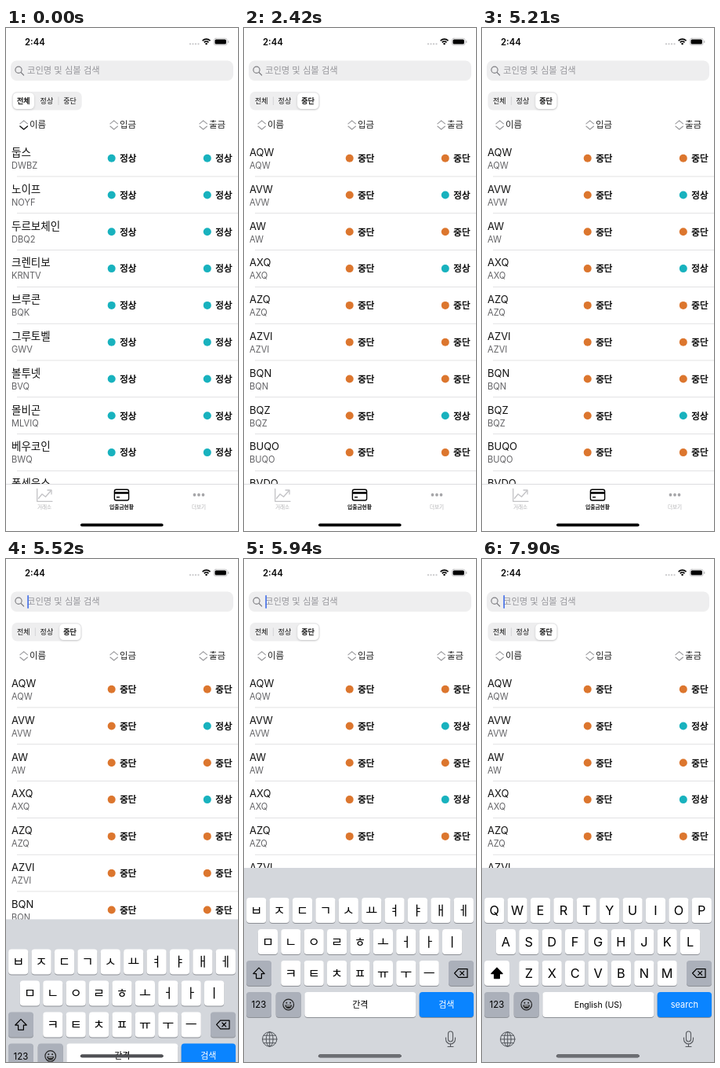
Recreate the animation shown at these times as an HTML page with a canvas. Size 296 by 640 pixels, loop 8000 ms.

```html
<!DOCTYPE html>
<html lang="ko">
<head>
<meta charset="utf-8">
<title>입출금현황</title>
<style>
html, body { margin: 0; width: 100%; height: 100%; overflow: hidden; background: #fff; }
canvas { display: block; width: 296px; height: 640px; }
</style>
</head>
<body>
<canvas id="stage"></canvas>
<script>
const W = 296, H = 640, LOOP = 8000;
const TEAL = '#18b2be', ORANGE = '#dc762e';
const FONT = 'Inter, "Noto Sans CJK KR", sans-serif';
const cv = document.getElementById('stage');
const c = cv.getContext('2d');
const dpr = window.devicePixelRatio || 1;
cv.width = W * dpr;
cv.height = H * dpr;

const pairs = s => s.split(',').map(p => p.split('/'));
const LISTS = [
  { rows: pairs('둡스/DWBZ,노이프/NOYF,두르보체인/DBQ2,크렌티보/KRNTV,브루콘/BQK,그루토벨/GWV,볼투넷/BVQ,몰비곤/MLVIQ,베우코인/BWQ,퐁센욱스/PWX') },
  { rows: pairs('1온체/1ONQE,ADWQ/ADWQ,AVUQ/AVUQ,LQ/LQ,NVQ/NVQ,SDWT/SDWT,골누/GLNU,보이너코인/BHQ,두허니2/DHQ2,부체인/BUQ') },
  { rows: pairs('AQW/AQW,AVW/AVW,AW/AW,AXQ/AXQ,AZQ/AZQ,AZVI/AZVI,BQN/BQN,BQZ/BQZ,BUQO/BUQO,BVDQ/BVDQ'),
    halted: true, open: [1, 3, 7] }
];
const KEYS = {
  ko: ['ㅂㅈㄷㄱㅅㅛㅕㅑㅐㅔ', 'ㅁㄴㅇㄹㅎㅗㅓㅏㅣ', 'ㅋㅌㅊㅍㅠㅜㅡ'],
  en: ['QWERTYUIOP', 'ASDFGHJKL', 'ZXCVBNM']
};

const clamp = x => Math.max(0, Math.min(1, x));
const ramp = (t, a, b) => clamp((t - a) / (b - a));
const easeOut = x => 1 - Math.pow(1 - x, 3);
const smooth = x => x * x * (3 - 2 * x);

function text(s, x, y, size, color, weight = 400, align = 'left') {
  c.font = `${weight} ${size}px ${FONT}`;
  c.fillStyle = color;
  c.textAlign = align;
  c.fillText(s, x, y);
}
// Hangul has no medium weight installed, so a thin outline thickens the regular one
function medium(s, x, y, size, color, align) {
  text(s, x, y, size, color, 400, align);
  pen(color, size * 0.035);
  c.strokeText(s, x, y);
}
function rect(x, y, w, h, color) {
  c.fillStyle = color;
  c.fillRect(x, y, w, h);
}
function round(x, y, w, h, r, color) {
  c.beginPath();
  c.roundRect(x, y, w, h, r);
  c.fillStyle = color;
  c.fill();
}
function disc(x, y, r, color) {
  c.beginPath();
  c.arc(x, y, r, 0, 7);
  c.fillStyle = color;
  c.fill();
}
function pen(color, width) {
  c.strokeStyle = color;
  c.lineWidth = width;
  c.lineCap = c.lineJoin = 'round';
}
function poly(pts, close) {
  c.beginPath();
  for (let i = 0; i < pts.length; i += 2) c.lineTo(pts[i], pts[i + 1]);
  if (close) c.closePath();
}
function line(...pts) {
  poly(pts);
  c.stroke();
}
function withAlpha(a, draw) {
  if (a <= 0) return;
  c.save();
  c.globalAlpha = a;
  draw();
  c.restore();
}

function statusBar() {
  text('2:44', 24, 21.6, 11.3, '#000', 600);
  for (let i = 0; i < 4; i++) disc(235 + i * 3.5, 20.3, 1.15, '#c8c8ca');
  pen('#000', 1.7);
  c.lineCap = 'butt';
  for (const r of [4, 7]) {
    c.beginPath();
    c.arc(255.6, 21.2, r, -Math.PI * 0.75, -Math.PI * 0.25);
    c.stroke();
  }
  c.beginPath();
  c.moveTo(255.6, 21.6);
  c.arc(255.6, 21.6, 2.4, -Math.PI * 0.75, -Math.PI * 0.25);
  c.fillStyle = '#000';
  c.fill();
  pen('#b4b4b6', 0.7);
  c.beginPath();
  c.roundRect(265.2, 13.2, 17, 8.6, 2.6);
  c.stroke();
  round(266.5, 14.5, 14.4, 6, 1.5, '#000');
  round(283.2, 16, 1.1, 3, 0.6, '#b4b4b6');
}

function searchField(focused) {
  round(6, 41.5, 284, 25.5, 7.5, '#eeeeef');
  pen('#808085', 1.2);
  c.beginPath();
  c.arc(16, 53.3, 4.1, 0, 7);
  c.stroke();
  line(19.1, 56.5, 22.6, 60);
  text('코인명 및 심볼 검색', 27, 58.2, 11.3, '#96969b');
  if (focused) round(27.3, 46, 1.6, 17, 0.8, '#3f6be8');
}

function segments(pos, pressed) {
  const step = 29.7;
  round(7.5, 81, 89.2, 23.4, 6.5, '#eeeeef');
  for (const i of [1, 2]) {
    const gap = Math.min(Math.abs(pos - i), Math.abs(pos - i + 1));
    withAlpha(clamp(gap), () => rect(7.2 + i * step, 87.5, 0.8, 10.5, '#cfcfd2'));
  }
  c.save();
  c.shadowColor = 'rgba(0,0,0,.16)';
  c.shadowBlur = 3 * dpr;
  c.shadowOffsetY = dpr;
  round(8.8 + pos * step, 82.5, 27.2, 20.4, 5.2, '#fff');
  c.restore();
  ['전체', '정상', '중단'].forEach((s, i) => {
    const label = Math.round(pos) === i ? medium : text;
    withAlpha(pressed === i ? 0.35 : 1, () => {
      c.textAlign = 'center';
      if (label === medium) medium(s, 22.2 + i * step, 96.2, 9, '#111', 'center');
      else text(s, 22.2 + i * step, 96.2, 9, '#111', 400, 'center');
    });
  });
}

function header(sorted) {
  [[22.7, '이름', 30], [137.7, '입금', 145], [251.7, '출금', 259]].forEach(([x, s, tx], i) => {
    pen('#98989b', 1.1);
    line(x - 4.8, 121.8, x, 117.8, x + 4.8, 121.8);
    line(x - 4.8, 125, x, 129, x + 4.8, 125);
    if (!i) withAlpha(sorted, () => {
      pen('#111', 1.2);
      line(x - 4.8, 125, x, 129, x + 4.8, 125);
    });
    text(s, tx, 127.2, 11.5, '#222');
  });
}

function state(x, y, halted) {
  disc(x, y, 5, halted ? ORANGE : TEAL);
  medium(halted ? '중단' : '정상', x + 10.5, y + 4.3, 11.5, '#000');
}

function list({ rows, halted, open = [] }) {
  rows.forEach(([name, code], i) => {
    const y = 142 + i * 46.8;
    text(name, 7, y + 21, /[가-힣]/.test(name) ? 13.5 : 13, '#111');
    text(code, 7, y + 37, 11.1, '#636366');
    state(134.7, y + 23.7, halted);
    state(256.8, y + 23.7, halted && !open.includes(i));
    rect(14, y + 46.6, W - 14, 0.7, '#d6d6d8');
  });
}

function tabBar() {
  rect(0, 580, W, 60, '#fff');
  rect(0, 580, W, 0.7, '#cfcfd1');
  pen('#c3c3c6', 1.3);
  line(39.7, 586.5, 39.7, 602.3, 59, 602.3);
  line(41.5, 598.5, 46, 593, 50.5, 596.5, 57.5, 588.5);
  line(53, 588, 58, 588, 58, 593);
  text('거래소', 49, 612.4, 6.6, '#b0b0b3', 400, 'center');
  pen('#000', 1.4);
  c.beginPath();
  c.roundRect(138.4, 587.2, 18.2, 13.8, 2.2);
  c.stroke();
  rect(138.4, 590.2, 18.2, 2.6, '#000');
  rect(141, 596.3, 4, 1.4, '#000');
  medium('입출금현황', 147.5, 612.4, 6.7, '#000', 'center');
  for (const x of [240.5, 246, 251.5]) disc(x, 594, 1.9, '#a5a5a8');
  text('더보기', 246, 612.4, 6.6, '#b0b0b3', 400, 'center');
}

function key(x, y, w, color = '#fff') {
  round(x, y + 1, w, 32, 4, '#8d9096');
  round(x, y, w, 32, 4, color);
}

function shiftIcon(filled) {
  poly([19, 520.2, 26.2, 527.6, 22.4, 527.6, 22.4, 533.6, 15.6, 533.6, 15.6, 527.6, 11.8, 527.6], true);
  pen('#000', 1.2);
  c.stroke();
  c.fillStyle = '#000';
  if (filled) c.fill();
}

function eraseIcon() {
  pen('#000', 1.2);
  poly([268.6, 527, 273.6, 521.6, 285, 521.6, 285, 532.4, 273.6, 532.4], true);
  c.stroke();
  line(275.8, 524.6, 280.6, 529.4);
  line(280.6, 524.6, 275.8, 529.4);
}

function smiley(x, y) {
  pen('#222', 1.2);
  c.beginPath();
  c.arc(x, y, 6.8, 0, 7);
  c.stroke();
  disc(x - 2.4, y - 2.2, 1, '#222');
  disc(x + 2.4, y - 2.2, 1, '#222');
  c.beginPath();
  c.arc(x, y + 0.6, 4.4, 0, Math.PI);
  c.closePath();
  c.fillStyle = '#222';
  c.fill();
  rect(x - 2.8, y + 1.3, 5.6, 1, '#d4d7dc');
}

function globe(x, y, color) {
  pen(color, 1);
  for (const rx of [9.2, 4.4]) {
    c.beginPath();
    c.ellipse(x, y, rx, 9.2, 0, 0, 7);
    c.stroke();
  }
  line(x, y - 9.2, x, y + 9.2);
  line(x - 9.2, y, x + 9.2, y);
  line(x - 7.8, y - 4.8, x + 7.8, y - 4.8);
  line(x - 7.8, y + 4.8, x + 7.8, y + 4.8);
}

function mic(x, y) {
  pen('#55585d', 1.1);
  c.beginPath();
  c.roundRect(x - 3, y - 10, 6, 13, 3);
  c.stroke();
  c.beginPath();
  c.moveTo(x - 6, y - 2);
  c.lineTo(x - 6, y);
  c.arc(x, y, 6, Math.PI, 0, true);
  c.lineTo(x + 6, y - 2);
  c.stroke();
  line(x, y + 6, x, y + 9.5);
  line(x - 3.5, y + 9.5, x + 3.5, y + 9.5);
}

function keyboard(drop, english, press) {
  const grey = '#abb0ba';
  c.save();
  c.translate(0, drop);
  rect(0, 393, W, 247, '#d4d7dc');
  KEYS[english ? 'en' : 'ko'].forEach((row, r) => {
    const y = 431 + r * 40;
    [...row].forEach((s, i) => {
      const x = 148 + (i - (row.length - 1) / 2) * 29.4;
      key(x - 12.6, y, 25.2);
      text(s, x, y + 22, 16.3, '#000', 400, 'center');
    });
  });
  key(3, 511, 32, english ? '#fff' : grey);
  shiftIcon(english);
  key(261, 511, 32, grey);
  eraseIcon();
  key(3, 551, 32, grey);
  text('123', 19, 571.2, 11.5, '#000', 400, 'center');
  key(40.7, 551, 32, grey);
  smiley(56.7, 567);
  key(77.3, 551, 142);
  text(english ? 'English (US)' : '간격', 148.3, 570.6, english ? 10.5 : 11, '#000', 400, 'center');
  key(223.7, 551, 69.3, '#0a84ff');
  text(english ? 'search' : '검색', 258.3, 570.6, 11, '#fff', 400, 'center');
  globe(32.7, 611, '#50545a');
  withAlpha(press, () => globe(32.7, 611, '#000'));
  mic(263.5, 611);
  c.restore();
}

function draw(t) {
  const tab = t < 2000 ? 0 : 1;
  const s = t - (tab ? 2000 : 500);
  const pos = tab + easeOut(ramp(s, 110, 480));
  const fade = smooth(ramp(s, 130, 410));
  const pressed = s >= 0 && s < 110 ? tab + 1 : -1;

  c.setTransform(dpr, 0, 0, dpr, 0, 0);
  rect(0, 0, W, H, '#fff');
  if (fade < 1) list(LISTS[tab]);
  withAlpha(fade, () => {
    rect(0, 140, W, 440, '#fff');
    list(LISTS[tab + 1]);
  });
  statusBar();
  searchField(t >= 5320);
  segments(pos, pressed);
  header(tab ? 0 : 1 - fade);
  tabBar();

  // Critically damped spring, settled by 5940
  const k = Math.max(0, t - 5320) * 0.013;
  const left = t >= 5940 ? 0 : (1 + k) * Math.exp(-k);
  if (left < 1) {
    const press = t < 7440 ? 0 : 1 - ramp(t, 7670, 7900);
    keyboard(247 * left, t >= 7670, press);
  }
  round(95, 630.5, 105.6, 3.7, 1.9, '#000');
  withAlpha(1 - left, () => round(95, 630.5, 105.6, 3.7, 1.9, '#6c6e73'));
}

const start = performance.now();
function tick() {
  draw((performance.now() - start) % LOOP);
  requestAnimationFrame(tick);
}
tick();
</script>
</body>
</html>
```
